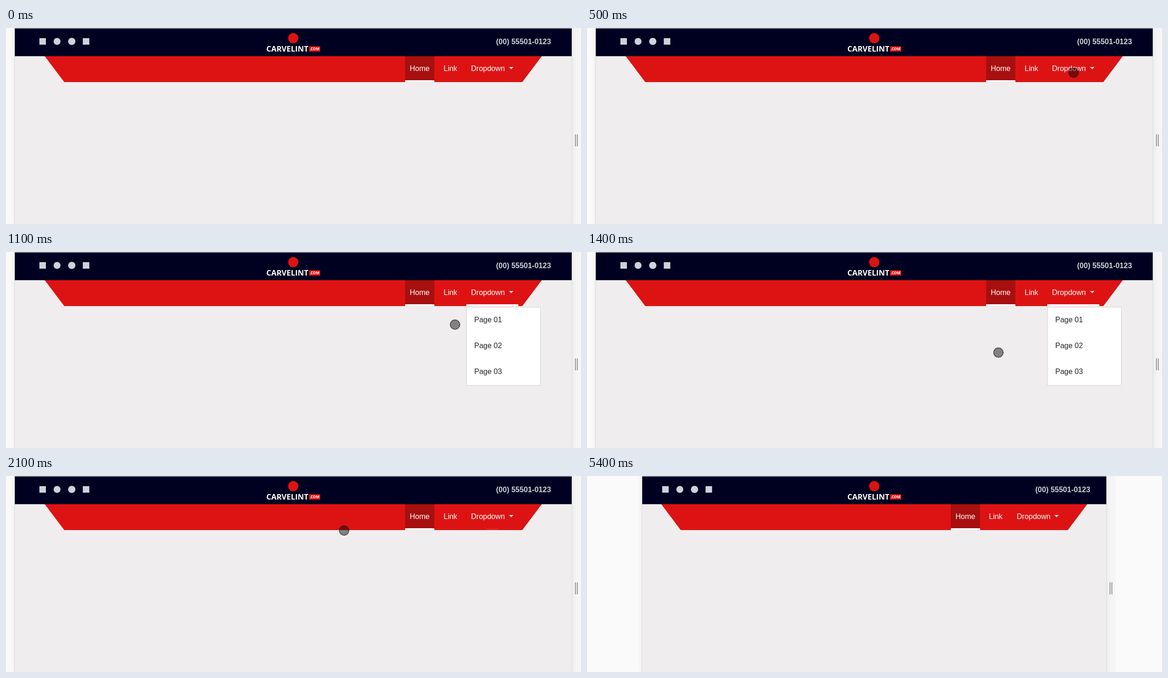
Recreate the animation shown at these times as an HTML page. Size 1239 by 424 pixels, loop 8000 ms.

```html
<!DOCTYPE html>
<html lang="en">
<head>
<meta charset="utf-8">
<title>Responsive navbar</title>
<style>
  html, body { margin: 0; width: 100%; height: 100%; overflow: hidden; background: #fafafa; }
  #stage { position: relative; width: 100%; height: 100%; overflow: clip; }
  #viewport {
    position: absolute; top: 0; height: 100%; box-sizing: border-box;
    border: 1px solid #dcdcdc; border-bottom: 0; background: #efedee;
    box-shadow: 0 0 10px rgba(155, 155, 155, .2);
  }
  #stage > svg { position: absolute; left: 0; top: 0; display: block; }
  text { font: 16px "Liberation Sans", Arial, sans-serif; fill: #fff; }
  #phone { font-weight: bold; fill: #ced2da; }
  #menu text { fill: #212529; }
  #underline { transform-box: fill-box; transform-origin: center; }
  .brand { font: bold 16.5px "Open Sans", sans-serif; }
  .suffix { font: bold 8px "Open Sans", sans-serif; }
</style>
</head>
<body>
<div id="stage">
<div id="viewport"></div>
<svg width="1239" height="424" viewBox="0 0 1239 424">
  <rect id="header" y="1" height="60" fill="#000020"/>

  <g id="social" fill="#ced2da">
    <rect x="72" y="22" width="14" height="14"/>
    <circle cx="110" cy="29" r="7.5"/>
    <circle cx="141.700" cy="29" r="7.800"/>
    <rect x="165.500" y="22" width="14" height="14"/>
  </g>

  <circle cx="619" cy="22" r="11" fill="#dd1313"/>
  <text class="brand" x="561" y="51">CARVELINT</text>
  <rect x="653" y="39.500" width="24" height="11.500" fill="#dd1313"/>
  <text class="suffix" x="654.500" y="48">.COM</text>

  <text id="phone" y="35">(00) 55501-0123</text>

  <polygon id="bar" fill="#dd1313"/>
  <g id="links">
    <rect data-x="860.25" y="61" width="63" height="52" fill="#a80f0f"/>
    <rect data-x="860.25" y="113" width="63" height="4" fill="#fff"/>
    <text data-x="870.25" y="93">Home</text>
    <text data-x="942.95" y="93">Link</text>
    <text data-x="1002.3" y="93">Dropdown</text>
    <svg data-x="1083.7" y="84.200" width="10" height="5"><path d="M0 0h9.600l-4.800 4.800z" fill="#fff"/></svg>
    <rect id="underline" data-x="992.3" y="113" width="112" height="4" fill="#fff"/>
  </g>

  <g id="menu">
    <rect x="992.500" y="119.500" width="159" height="169" fill="#fff" stroke="#d4d3d3"/>
    <text x="1009" y="152">Page 01</text>
    <text x="1009" y="208">Page 02</text>
    <text x="1009" y="264">Page 03</text>
  </g>

  <g id="handle">
    <rect width="18" height="424" fill="#9b9b9b" fill-opacity=".05"/>
    <path d="M7 230v26M11 230v26" stroke="#999" stroke-width="2"/>
  </g>

  <g id="cursor">
    <circle r="11" fill="#000" fill-opacity=".45"/>
    <circle r="10" fill="none" stroke="#111" stroke-width="1.500" stroke-dasharray="1.800 1.800"/>
  </g>
</svg>
</div>
<script>
const LOOP = 8000, STEP = 100;
const $ = id => document.getElementById(id);
const set = (id, attrs) => {
  for (const name in attrs) $(id).setAttribute(name, attrs[name]);
};
const show = (id, visible) => set(id, { visibility: visible ? "visible" : "hidden" });
const shift = (id, x, y = 0) => set(id, { transform: `translate(${x} ${y})` });
const clamp = x => Math.min(1, Math.max(0, x));
const smooth = x => x * x * (3 - 2 * x);
const easeOut = x => 1 - (1 - x) ** 2;
const linear = x => x;

// The CSS "ease" curve: cubic-bezier(.25, .1, .25, 1)
function ease(x) {
  const curve = (s, a, b) => 3 * (1 - s) ** 2 * s * a + 3 * (1 - s) * s * s * b + s ** 3;
  let low = 0, high = 1;
  for (let i = 0; i < 20; i++) {
    const mid = (low + high) / 2;
    if (curve(mid, .25, .25) < x) low = mid; else high = mid;
  }
  return curve(low, .1, 1);
}

const moves = [
  { start: 200, end: 500, from: [995.5, 67.5], to: [1048.5, 96.5], easing: easeOut },
  { start: 800, end: 1400, from: [1048.5, 96.5], to: [886.5, 217.5], easing: smooth },
  { start: 2000, end: 2200, from: [886.5, 217.5], to: [570.5, 18.5], easing: linear },
];

function layout(wide) {
  const left = wide ? 19 : 119, width = wide ? 1200 : 1000;
  const barLeft = wide ? 83.5 : 160, barRight = wide ? 1154.5 : 1078;
  $("viewport").style.left = left - 1 + "px";
  $("viewport").style.width = width + 2 + "px";
  set("header", { x: left, width });
  set("phone", { x: wide ? 1056 : 966 });
  set("bar", { points: `${barLeft},61 ${barRight},61 ${barRight - 42},117 ${barLeft + 42},117` });
  shift("social", wide ? 0 : 90);
  shift("handle", left + width + 1);

  // Links follow the bar's right edge, snapped to whole pixels
  for (const item of $("links").children) {
    item.setAttribute("x", Math.round(+item.dataset.x + barRight - 1154.5));
  }
}

function draw(t) {
  layout(t < 5400);
  show("menu", t >= 800 && t < 2000);

  const grow = ease(clamp((t - 750) / 300)) - ease(clamp((t - 1960) / 300));
  $("underline").style.transform = `scale(${grow})`;
  $("underline").style.opacity = grow;

  show("cursor", t >= 200 && t < 2300);
  const { start, end, from, to, easing } = moves.findLast(m => t >= m.start) || moves[0];
  const p = easing(clamp((t - start) / (end - start)));
  shift("cursor", ...from.map((v, i) => v + (to[i] - v) * p));
}

function tick() {
  const t = performance.now() % LOOP;
  draw(Math.floor(t / STEP) * STEP);
  requestAnimationFrame(tick);
}
tick();
</script>
</body>
</html>
```
